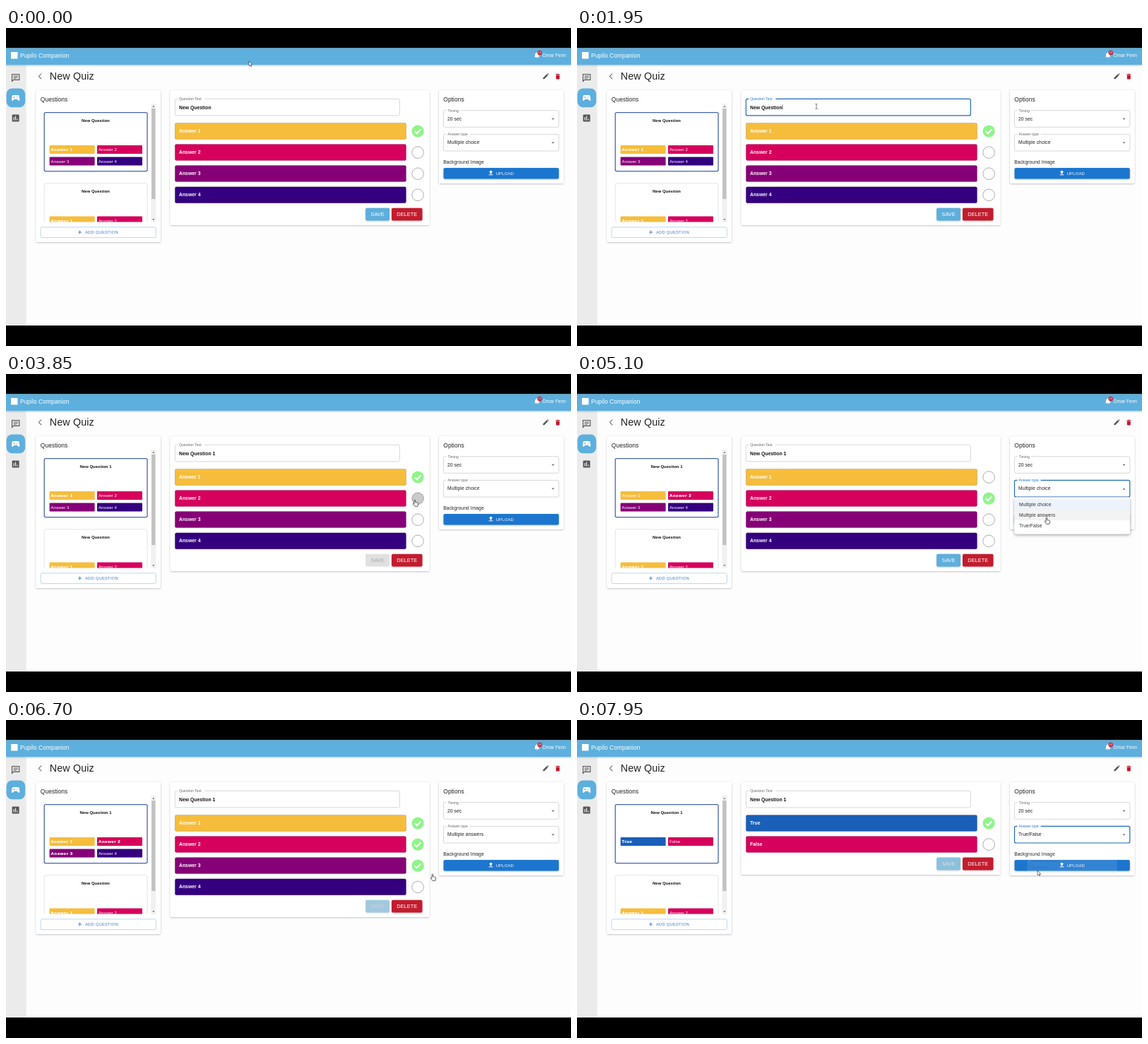
Animation of 800 by 450 pixels, one loop 8 s. Source, as an HTML page:

```html
<!DOCTYPE html>
<html lang="en">
<head>
<meta charset="utf-8">
<title>Quiz editor</title>
<style>
html, body { margin: 0; width: 100%; height: 100%; overflow: hidden; background: #000; }
svg { display: block; width: 100vw; height: 100vh; }
text { font-family: "Liberation Sans", Arial, sans-serif; letter-spacing: .0094em; white-space: pre; }
</style>
</head>
<body>
<svg id="stage" viewBox="0 0 800 450"></svg>
<script>
const LOOP = 8000, STEP = 50;
const BLUE = '#5dafdd', PRIMARY = '#1c76cf', INK = '#222';
const MULTI = [['Answer 1', '#f6bd3c'], ['Answer 2', '#d6005d'], ['Answer 3', '#860077'], ['Answer 4', '#35007f']];
const BOOLEAN = [['True', '#1a5fb8'], ['False', '#d6005d']];
const TYPES = ['Multiple choice', 'Multiple answers', 'True/False'];

// Pointer path: time, x, y, pointer kind from then on
const PATH = [
  [0, 344, 47, 'arrow'], [500, 344, 50, 'arrow'], [1000, 341, 98, 'beam'], [1300, 339, 111, 'beam'],
  [2550, 339, 111, 'beam'], [2700, 400, 160, 'arrow'], [2950, 527, 262, 'hand'], [3250, 527, 262, 'hand'],
  [3450, 550, 235, 'arrow'], [3700, 577, 180, 'hand'], [3850, 578, 178, 'hand'], [4100, 579, 178, 'hand'],
  [4250, 610, 172, 'arrow'], [4450, 664, 163, 'hand'], [4700, 664, 163, 'hand'], [5000, 664, 201, 'hand'],
  [5100, 664, 203, 'hand'], [5300, 664, 201, 'hand'], [5450, 640, 182, 'arrow'], [5700, 582, 146, 'hand'],
  [5880, 582, 146, 'hand'], [6080, 582, 204, 'hand'], [6230, 582, 204, 'hand'], [6430, 530, 262, 'hand'],
  [6560, 530, 262, 'hand'], [6700, 603, 218, 'hand'], [6950, 664, 163, 'hand'], [7200, 666, 163, 'hand'],
  [7450, 667, 197, 'hand'], [7550, 667, 199, 'hand'], [7700, 652, 213, 'hand'], [7850, 652, 213, 'arrow'],
  [8000, 652, 213, 'arrow']
];
const MENUS = [[4600, 5250], [7100, 7780]];
const SAVE_TOGGLES = [[3100, 0], [4050, 1], [6570, 0], [7800, 1]];

const clamp = v => Math.max(0, Math.min(1, v));
const smooth = v => v * v * (3 - 2 * v);
const rect = (x, y, w, h, fill, r = 0, extra = '') =>
  `<rect x="${x}" y="${y}" width="${w}" height="${h}" rx="${r}" fill="${fill}" ${extra}/>`;
const text = (s, x, y, size, fill = INK, extra = '') =>
  `<text x="${x}" y="${y}" font-size="${size}" fill="${fill}" ${extra}>${s}</text>`;
const path = (d, fill, extra = '') => `<path d="${d}" fill="${fill}" ${extra}/>`;
const circle = (x, y, r, fill, extra = '') => `<circle cx="${x}" cy="${y}" r="${r}" fill="${fill}" ${extra}/>`;
const group = (attrs, body) => `<g ${attrs}>${body}</g>`;
const stroke = (color, width) => `stroke="${color}" stroke-width="${width}"`;
const MIDDLE = 'text-anchor="middle"', BOLD = 'font-weight="bold"';
const card = (x, y, w, h) => rect(x, y, w, h, '#fff', 2, 'filter="url(#soft)"');
const button = (s, x, y, w, fill) => rect(x, y, w, 17.8, fill, 2, 'filter="url(#soft)"')
  + text(s, x + w / 2, y + 11.2, 7.3, '#fff', MIDDLE);

function pointer(t) {
  const i = Math.max(0, PATH.findIndex(p => p[0] > t) - 1);
  const [t0, x0, y0, kind] = PATH[i], [t1, x1, y1] = PATH[i + 1];
  const k = smooth((t - t0) / (t1 - t0));
  return { x: x0 + (x1 - x0) * k, y: y0 + (y1 - y0) * k, kind };
}

function drawPointer({ x, y, kind }) {
  const shapes = {
    arrow: path('M0 0V6.6L1.6 5.2L2.7 7.6L3.7 7.1L2.7 4.8H4.6Z', '#fff', stroke('#222', .6)),
    beam: path('M-1.6-3.4H-.4L0-3L.4-3.4H1.6M0-3V3M-1.6 3.4H-.4L0 3L.4 3.4H1.6', 'none', stroke('#444', .7)),
    hand: path('M0 .5Q.8-.5 1.6 .5V3.6L4.8 4.2Q5.8 4.5 5.6 5.8L5 9.3H.8L-1.6 6.2Q-2 5-.9 5.1L0 5.8Z', '#fff', stroke('#222', .7))
  };
  return group(`transform="translate(${x} ${y})"`, shapes[kind]);
}

function field(label, x, y, w, notch, focused) {
  const color = focused ? '#1c6bb8' : '#c6c6c6';
  return rect(x, y, w, 23.6, '#fff', 2, stroke(color, focused ? 1.2 : .7))
    + rect(x + 4, y - 1.5, notch, 3, '#fff')
    + text(label, x + 6, y + 1.8, 5.05, focused ? PRIMARY : '#666');
}

function select(label, value, y, notch, focused, open) {
  return field(label, 619.5, y, 163.3, notch, focused)
    + text(value, 625, y + 14, 6.74)
    + path(open ? 'M772.4 1.1h4.2l-2.1-2.1z' : 'M772.4-1h4.2l-2.1 2.1z', '#666', `transform="translate(0 ${y + 12})"`);
}

function thumbnail(y, title, answers, correct, selected) {
  const bars = answers.map(([name, color], i) => {
    const x = 61.6 + i % 2 * 67.4, top = y + 46.5 + (i >> 1) * 16.3;
    const style = correct.includes(i)
      ? `${BOLD} style="letter-spacing:.5px" ${stroke('#fff', .2)}` : '';
    return rect(x, top, 64, 12, color, 1) + text(name, x + 2, top + 8.3, 6.1, '#fff', style);
  }).join('');
  return rect(54.2, y, 145.8, 83, '#fff', 2, selected ? stroke('#4564ad', 1.3) : stroke('#ddd', .8))
    + text(title.trim(), 127, y + 13.1, 5.9, '#111', `${BOLD} ${MIDDLE}`) + bars;
}

function frameChrome() {
  return rect(0, 28.5, 800, 392.5, '#fdfdfd')
    + rect(0, 52, 28.6, 369, '#ebebec')
    + rect(0, 28.5, 800, 23.7, BLUE, 0, 'filter="url(#soft)"')
    + rect(7, 34, 9.5, 9.5, '#fff')
    + text('Pupilo Companion', 20, 41.5, 8.35, '#fff')
    + text('Omar Fenn', 793, 41, 6.5, '#fff', 'text-anchor="end"')
    + path('M748 41.2L749 40V37.6Q749.3 35.2 751.2 35V34.3H752.3V35Q754.3 35.2 754.6 37.6V40L755.6 41.2ZM750.9 41.9H752.8Q752 43.2 750.9 41.9Z', '#fff')
    + circle(755.7, 35, 3.3, '#c8243b') + text('10', 755.7, 36.4, 3.8, '#fff', MIDDLE)
    // sidebar
    + path('M8.5 65.5H18.8V73.4H10.6L8.5 75.5Z', 'none', stroke('#555', 1.1))
    + path('M10.5 67.7H17M10.5 69.5H17M10.5 71.3H15', 'none', stroke('#555', .8))
    + rect(.6, 85.5, 26.6, 26.8, BLUE, 8)
    + path('M10.3 95H17Q18.4 95 18.7 96.4L19.4 101.5Q19.2 103.4 17.6 102.8L15.6 100.8H11.7L9.7 102.8Q8.1 103.4 7.9 101.5L8.6 96.4Q8.9 95 10.3 95Z', '#fff')
    + path('M10 98.2H12.8M11.4 96.8V99.6', 'none', stroke(BLUE, .7)) + circle(15, 99, .6, BLUE) + circle(16.4, 97.3, .6, BLUE)
    + rect(8.6, 122.4, 10, 10, '#555', 1)
    + path('M11.2 126V130.5M13.6 124.5V130.5M16 128.4V130.5', 'none', stroke('#fff', 1.1))
    // page title
    + path('M50 64.5L46.4 68.4L50 72.3', 'none', stroke('#333', 1))
    + text('New Quiz', 61.8, 73.2, 14.3)
    + path('M760.4 70.5L765.6 65.3L767.4 67.1L762.2 72.3H760.4ZM766.2 64.7L767 64L768.7 65.7L768 66.5Z', '#555')
    + path('M778.3 65.2H780L780.4 64.7H782.2L782.6 65.2H784.3V66.2H778.3ZM778.8 66.8H783.8V71.6Q783.7 72.5 782.9 72.5H779.7Q778.9 72.5 778.8 71.6Z', '#c5162b');
}

function questionList(title, answers, correct) {
  return card(42.4, 88, 176.6, 215) + text('Questions', 48.8, 103.6, 8.42)
    + group('clip-path="url(#list)"', thumbnail(119.6, title, answers, correct, true)
      + thumbnail(219.9, 'New Question', MULTI, [0], false))
    + rect(205.3, 107, 7, 168, '#f1f1f1') + rect(206.2, 114, 5.2, 128, '#c1c1c1')
    + path('M207.2 111.8H210.4L208.8 110ZM207.2 270.3H210.4L208.8 272.1Z', '#555')
    + rect(49, 281.8, 163.3, 14.8, '#fff', 2, stroke('#a3c4e8', .7))
    + path('M102 289H107M104.5 286.5V291.5', 'none', stroke('#3a7cc4', .9))
    + text('ADD QUESTION', 112, 291.3, 5.9, '#3a7cc4', 'style="letter-spacing:.0285em"');
}

function editor(t, title, answers, correct, mouse, saveLevel) {
  const focused = t >= 1500 && t < 3100;
  const bottom = answers.length * 30.1;
  let out = card(232.5, 88, 367, 70.7 + bottom)
    + field('Question Text', 239.3, 100.3, 318, 38, focused)
    + text(title, 245, 114.5, 6.74, '#111', BOLD);
  if (focused && (t - 1500) % 1000 < 500) {
    const typed = title.length - 'New Question'.length;
    out += rect(290.7 + [0, 1.9, 5.7][typed], 108.2, .6, 7.2, '#222');
  }
  answers.forEach(([name, color], i) => {
    const y = 134.4 + i * 30.1, cy = y + 11.6;
    const hover = Math.hypot(mouse.x - 583, mouse.y - cy) < 9;
    out += rect(239.3, y, 327.2, 23, color, 2, 'stroke="#000" stroke-opacity=".22" stroke-width=".7"')
      + text(name, 245, y + 13.7, 6.74, '#fff', BOLD);
    out += correct.includes(i)
      ? circle(583.1, cy, 8.6, '#8ff589') + path(`M578.8 ${cy + .2}l3 3l5.7-6`, 'none', stroke('#fff', 2))
      : circle(583.1, cy, 8.3, hover ? '#cacaca' : '#fff', stroke('#8b8b8b', .7));
  });
  const y = 134.4 + bottom;
  return out + rect(509.2, y, 33.8, 17.8, '#e0e0e0', 2)
    + text('SAVE', 526.1, y + 11.2, 7.3, '#a6a6a6', MIDDLE)
    + group(`opacity="${saveLevel}"`, button('SAVE', 509.2, y, 33.8, BLUE))
    + button('DELETE', 546, y, 43.5, '#c31b2d');
}

function options(t, type, open) {
  const focused = MENUS.some(([start], i) => t >= start && t < [5850, LOOP][i]);
  return card(613, 88, 176.5, 132) + text('Options', 619.3, 103.6, 8.42)
    + select('Timing', '20 sec', 116.7, 19, false, false)
    + select('Answer type', TYPES[type], 150.4, 33, focused, open)
    + text('Background Image', 619.2, 192.2, 6.74)
    + rect(619.5, 198, 163.3, 15.6, PRIMARY, 2, 'filter="url(#soft)"')
    + path('M685.3 206.2V204.1H683.7L686.5 201.4L689.3 204.1H687.7V206.2ZM683.7 207.2H689.3V208.3H683.7Z', '#fff')
    + text('UPLOAD', 706.3, 208, 5.9, '#fff', `${MIDDLE} style="letter-spacing:.0285em"`);
}

function menu(t, type, mouse) {
  const span = MENUS.find(([start, end]) => t >= start && t < end + 220);
  if (!span) return '';
  const level = t < span[1] ? smooth(clamp((t - span[0]) / 200)) : 1 - clamp((t - span[1]) / 190);
  const scale = .75 + .25 * level;
  const items = TYPES.map((name, i) => {
    const y = 177 + i * 15.1;
    const hover = t < span[1] && mouse.y >= y && mouse.y < y + 15.1;
    const fill = i === type ? (hover ? '#e8f0f8' : '#edf3fa') : hover ? '#f3f3f3' : '#fff';
    return rect(619.5, y, 163.3, 15.1, fill) + text(name, 626, y + 10, 6.74, '#333');
  }).join('');
  return group(`opacity="${level}" transform="translate(701 200) scale(${scale} ${scale * scale}) translate(-701 -200)"`,
    rect(619.5, 174.6, 163.3, 51.6, '#fff', 2, 'filter="url(#deep)"') + items);
}

function render(t) {
  const mouse = pointer(t);
  const title = 'New Question' + (t < 2250 ? '' : t < 2400 ? ' ' : ' 1');
  const type = t < 5250 ? 0 : t < 7780 ? 1 : 2;
  const answers = type === 2 ? BOOLEAN : MULTI;
  const correct = type === 2 || t < 4050 ? [0] : t < 5850 ? [1] : t < 6180 ? [0, 1] : [0, 1, 2];
  const open = MENUS.some(([start, end]) => t >= start && t < end);
  let saveLevel = 1;
  for (const [start, goal] of SAVE_TOGGLES)
    if (t >= start) saveLevel = 1 - goal + (2 * goal - 1) * smooth(clamp((t - start) / 250));
  return `<defs>
    <filter id="soft" x="-10%" y="-20%" width="120%" height="150%"><feDropShadow dx="0" dy=".7" stdDeviation=".8" flood-opacity=".28"/></filter>
    <filter id="deep" x="-10%" y="-20%" width="120%" height="150%"><feDropShadow dx="0" dy="1.5" stdDeviation="2" flood-opacity=".4"/></filter>
    <clipPath id="list"><rect x="50" y="107" width="155" height="167.6"/></clipPath></defs>`
    + frameChrome() + questionList(title, answers, correct)
    + editor(t, title, answers, correct, mouse, saveLevel)
    + options(t, type, open) + menu(t, type, mouse) + drawPointer(mouse);
}

const stage = document.getElementById('stage');
let shown = -1;
function tick() {
  const t = Math.floor(performance.now() % LOOP / STEP) * STEP;
  if (t !== shown) stage.innerHTML = render(shown = t);
  requestAnimationFrame(tick);
}
tick();
</script>
</body>
</html>
```
